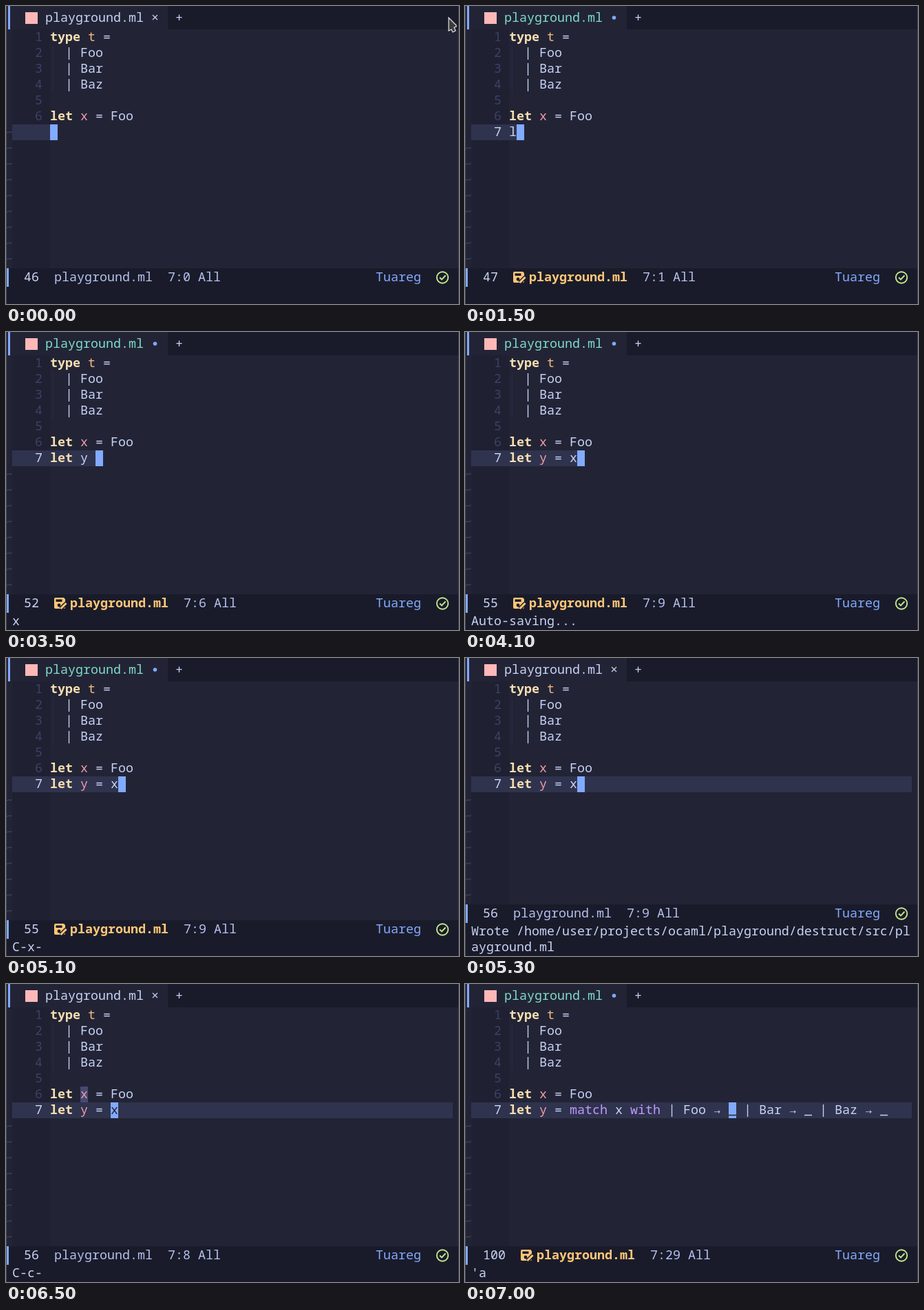
An HTML page with a canvas that plays this animation: 658x433 px, repeating every 8 s.

```html
<!DOCTYPE html>
<html lang="en">
<head>
<meta charset="utf-8">
<title>Editor session</title>
<style>
  html, body { margin: 0; width: 658px; height: 433px; overflow: hidden; background: #222436; }
  canvas { display: block; }
</style>
</head>
<body>
<canvas id="stage" width="658" height="433"></canvas>
<script>
const ctx = document.getElementById('stage').getContext('2d');
const LOOP = 8000, CELL = 11, ROW = 23, TEXT_X = 64, TOP = 34;
const FONT = '18.333px "Noto Sans Mono", "DejaVu Sans Mono", monospace';

const C = {
  bg: '#222436', gutter: '#1f2032', bar: '#1a1b2a', band: '#2f334d',
  fg: '#c8d3f5', dim: '#3d4163', tilde: '#3b4061', blue: '#82aaff',
  wheat: '#f8dfb0', type: '#f5b880', name: '#f39aa8', purple: '#c099ff',
  teal: '#7fdcc8', amber: '#ffc777', green: '#c3e88d', pink: '#ffb8b8',
  same: '#444a73', edge: '#454b58'
};

const PATH = '/home/user/projects/ocaml/playground/destruct/src/playground.ml';
const CASES = 'let y = match x with | Foo → _ | Bar → _ | Baz → _';

// Each step overrides part of the state before it.
const STEPS = [
  { at: 0, code: '', col: 0, echo: '', saved: true, newline: false, marks: false, pointer: true },
  { at: 1500, code: 'l', saved: false, pointer: false },
  { at: 1600, code: 'le' },
  { at: 1700, code: 'let' },
  { at: 1800, code: 'let ' },
  { at: 2800, code: 'let y' },
  { at: 3300, echo: 'x' },
  { at: 3500, code: 'let y ' },
  { at: 3900, code: 'let y =', echo: '' },
  { at: 4000, code: 'let y = ' },
  { at: 4100, code: 'let y = x', echo: 'Auto-saving...' },
  { at: 4200, echo: 'Auto-saving...done' },
  { at: 4300, code: 'let y = x ', echo: '' },
  { at: 4600, code: 'let y = x', echo: 't' },
  { at: 5100, echo: 'C-x-' },
  { at: 5200, echo: 'Saving file ' + PATH + '...', newline: true },
  { at: 5300, echo: 'Wrote ' + PATH, saved: true },
  { at: 5700, echo: '', col: 8 },
  { at: 6200, echo: 'type t = Foo | Bar | Baz', marks: true },
  { at: 6500, echo: 'C-c-' },
  { at: 7000, code: CASES, col: 29, echo: "'a", saved: false, marks: false }
];

function stateAt(ms) {
  const s = {};
  for (const step of STEPS) {
    if (step.at > ms) break;
    Object.assign(s, step);
    if (step.code !== undefined && step.col === undefined) s.col = step.code.length;
  }
  return s;
}

function box(x, y, w, h, color) {
  ctx.fillStyle = color;
  ctx.fillRect(x, y, w, h);
}

function text(str, x, y, color, bold) {
  ctx.font = (bold ? 'bold ' : '') + FONT;
  ctx.fillStyle = color;
  ctx.fillText(str, x, y);
}

function poly(points, close) {
  ctx.beginPath();
  points.forEach(([x, y], i) => i ? ctx.lineTo(x, y) : ctx.moveTo(x, y));
  if (close) ctx.closePath();
}

const rowTop = n => TOP + (n - 1) * ROW;
const colX = c => TEXT_X + c * CELL;

// Splits a line into words and colours them like the editor does.
function codeLine(str, x, y) {
  const definition = str.includes('=');
  let prev = '';
  for (const m of str.matchAll(/\S+/g)) {
    const word = m[0];
    let color = C.fg;
    const bold = word === 'let' || word === 'type';
    if (bold) color = C.wheat;
    else if (word === 'match' || word === 'with') color = C.purple;
    else if (definition && prev === 'let') color = C.name;
    else if (prev === 'type') color = C.type;
    text(word, x + m.index * CELL, y, color, bold);
    prev = word;
  }
}

function drawTilde(y) {
  ctx.strokeStyle = C.tilde;
  ctx.lineWidth = 1.3;
  ctx.beginPath();
  ctx.moveTo(1.5, y + 2);
  ctx.bezierCurveTo(3, y - 3, 6, y + 4, 8.5, y - 1);
  ctx.stroke();
}

function drawTabs(s) {
  box(0, 0, 658, TOP, C.bar);
  box(0, 0, 235, TOP, C.bg);
  box(3, 0, 3, TOP, C.blue);
  box(28, 9, 18, 17, C.pink);
  text('playground.ml', 57, 23, s.saved ? C.fg : C.teal);
  if (s.saved) {
    text('×', 211, 23, C.fg);
  } else {
    ctx.fillStyle = C.blue;
    ctx.beginPath();
    ctx.arc(216.5, 17, 2.8, 0, 7);
    ctx.fill();
  }
  text('+', 246, 23, C.fg);
}

function drawBuffer(s) {
  const lines = ['type t =', '  | Foo', '  | Bar', '  | Baz', '', 'let x = Foo'];
  const y7 = rowTop(7);
  const cursor = colX(s.col);

  box(9, TOP, 55, 347, C.gutter);
  box(68, rowTop(2), 1, 3 * ROW, '#282b40');
  lines.forEach((line, i) => {
    text(i + 1, 42, rowTop(i + 1) + 17, C.dim);
    if (s.marks && i === 5) box(colX(4), rowTop(6), CELL, ROW, C.same);
    codeLine(line, TEXT_X, rowTop(i + 1) + 17);
  });

  box(9, y7, (s.newline ? 649 : cursor) - 9, ROW, C.band);
  if (s.code) text('7', 42, y7 + 17, C.fg);
  codeLine(s.code, TEXT_X, y7 + 17);
  box(cursor, y7, CELL, ROW, C.blue);
  const under = s.code[s.col];
  if (under) text(under, cursor, y7 + 17, C.bg);

  for (let row = s.code ? 8 : 7; row <= 15; row++) drawTilde(rowTop(row) + 11);
}

function drawSaveIcon(x, y) {
  ctx.fillStyle = C.amber;
  ctx.beginPath();
  ctx.roundRect(x, y - 8, 16, 16, 2);
  ctx.fill();
  box(x + 2.5, y - 5.5, 9, 3.5, C.bar);
  poly([[x + 13, y - 9], [x + 17, y - 9], [x + 17, y - 5]], true);
  ctx.fillStyle = C.bar;
  ctx.fill();
  ctx.beginPath();
  ctx.arc(x + 7, y + 3, 2.4, 0, 7);
  ctx.fill();
  // pencil with a dark outline
  for (const [width, color] of [[6, C.bar], [3, C.amber]]) {
    ctx.strokeStyle = color;
    ctx.lineWidth = width;
    poly([[x + 9.5, y + 8], [x + 17.5, y]]);
    ctx.stroke();
  }
}

function drawModeLine(s, top) {
  const base = top + 19, mid = top + 13;
  const count = String(46 + s.code.replace(/→/g, '->').length + (s.newline ? 1 : 0));
  let x = 26;
  box(0, top, 658, 27, C.bar);
  box(1, top, 3, 27, C.blue);
  text(count, x, base, C.fg);
  x += (count.length + 2) * CELL;
  if (!s.saved) {
    drawSaveIcon(x, mid);
    x += 23;
  }
  text('playground.ml', x, base, s.saved ? '#b4c2f0' : C.amber, !s.saved);
  text('7:' + s.col + ' All', x + 15 * CELL, base, '#b4c2f0');
  text('Tuareg', 537, base, C.blue);

  ctx.strokeStyle = C.green;
  ctx.lineWidth = 1.9;
  ctx.beginPath();
  ctx.arc(634, mid + 0.5, 8.2, 0, 7);
  ctx.stroke();
  poly([[630, mid + 0.5], [633, mid + 3.5], [638.5, mid - 2.5]]);
  ctx.stroke();
}

function drawEcho(s, top, rows) {
  box(0, top, 658, 433 - top, C.bar);
  rows.forEach((row, i) => {
    const y = top + 18 + i * ROW;
    if (row.startsWith('type ')) codeLine(row, 9, y);
    else text(row, 9, y, C.fg);
  });
}

function drawPointer() {
  poly([[643, 17], [654, 28], [654, 30], [651, 31], [653, 36], [649, 38], [647, 34], [643, 36]], true);
  ctx.fillStyle = '#3c3c3c';
  ctx.fill();
  ctx.strokeStyle = '#e4e4e4';
  ctx.lineWidth = 1.2;
  ctx.stroke();
}

function draw(ms) {
  const s = stateAt(ms);
  const rows = s.echo.match(/.{1,58}/g) || [''];
  const modeTop = 381 - (rows.length - 1) * ROW;
  box(0, 0, 658, 433, C.bg);
  drawTabs(s);
  drawBuffer(s);
  drawModeLine(s, modeTop);
  drawEcho(s, modeTop + 27, rows);
  box(0, 0, 1, 433, C.edge);
  box(657, 0, 1, 433, C.edge);
  if (s.pointer) drawPointer();
}

let start;
function tick(now) {
  if (start === undefined) start = now;
  draw((now - start) % LOOP);
  requestAnimationFrame(tick);
}
draw(0);
requestAnimationFrame(tick);
</script>
</body>
</html>
```
